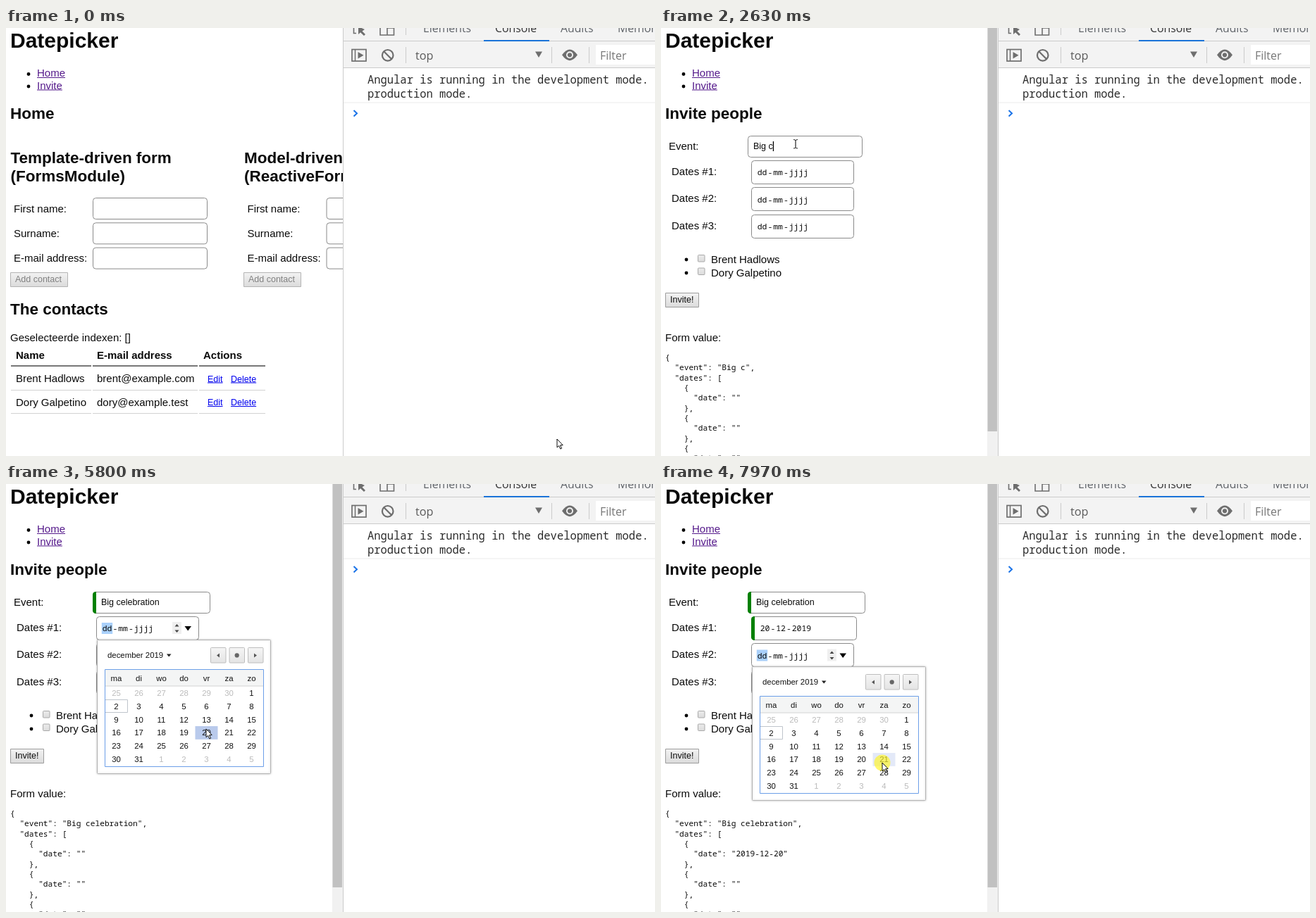
These frames come from a looping animation (921 px wide and 608 px high, 8 s). An HTML page with a canvas:

```html
<!DOCTYPE html>
<html lang="en">
<head>
<meta charset="utf-8">
<title>Datepicker</title>
<style>
html, body { margin: 0; width: 100%; height: 100%; overflow: hidden; background: #fff; }
canvas { display: block; width: 921px; height: 608px; }
</style>
</head>
<body>
<canvas id="stage" width="921" height="608"></canvas>
<script>
const ctx = document.getElementById('stage').getContext('2d');
const LOOP = 8000;
const SANS = '"Liberation Sans", Arial, sans-serif';
const UI = '"Open Sans", "Noto Sans", sans-serif';
const MONO = '"Noto Sans Mono", "DejaVu Sans Mono", monospace';
const BORDER = '#8a8a8a';
const INK = '#0a0a0a';
const PEOPLE = [['Brent Hadlows', 'brent@example.com'], ['Dory Galpetino', 'dory@example.test']];
const EVENT = 'Big celebration';

// The screen updates about 13 times a second: [ms, tick]
const CLOCK = [[0, 0], [70, 1], [840, 11], [1530, 20], [1700, 22], [1770, 23], [2170, 28], [2780, 36],
  [3030, 39], [4020, 52], [4870, 63], [5560, 72], [5730, 74], [5800, 75], [6340, 82], [6510, 84],
  [6970, 90], [7280, 94], [7970, 103], [8047, 104]];
// Pointer path: [tick, x, y]
const PATH = [[0, 782, 584], [9, 59, 77], [12, 59, 77], [17, 190, 144], [18, 190, 144], [20, 191, 165],
  [51, 191, 165], [60, 256, 204], [64, 256, 204], [69, 287, 421], [72, 284, 348], [76, 284, 348],
  [79, 256, 247], [80, 256, 247], [82, 257, 241], [86, 257, 241], [90, 332, 371], [94, 310, 399],
  [95, 310, 399], [99, 314, 396], [104, 314, 396]];
// Letters typed: [tick, count]
const TYPED = [[28, 1], [30, 2], [31, 3], [32, 4], [34, 5], [36, 7], [38, 8], [39, 9], [41, 10],
  [43, 11], [44, 12], [46, 14], [47, 15]];
const CLICKS = [11, 22, 61, 74, 84, 103];
const AT = { page: 12, focus: 23, type: 28, date1: 62, open1: 64, press: 75, pick: 76, date2: 85, open2: 87 };

const clamp = v => Math.max(0, Math.min(1, v));

function tickAt(ms) {
  const i = CLOCK.findIndex(c => c[0] > ms);
  const [a, b] = [CLOCK[i - 1], CLOCK[i]];
  return Math.floor(a[1] + (ms - a[0]) / (b[0] - a[0]) * (b[1] - a[1]) + 0.1);
}

function pointerAt(tick) {
  const i = PATH.findIndex(p => p[0] > tick);
  if (i < 0) return PATH[PATH.length - 1].slice(1);
  const [a, b] = [PATH[i - 1], PATH[i]];
  const p = (tick - a[0]) / (b[0] - a[0]);
  const e = p * p * (3 - 2 * p);
  return [a[1] + (b[1] - a[1]) * e, a[2] + (b[2] - a[2]) * e];
}

function text(s, x, y, font, color = INK, align = 'left') {
  ctx.font = font;
  ctx.fillStyle = color;
  ctx.textAlign = align;
  ctx.fillText(s, x, y);
}
const body = (s, x, y, color) => text(s, x, y, `15px ${SANS}`, color);
const bold = (s, x, y, size = 22.5) => text(s, x, y, `bold ${size}px ${SANS}`);

function rect(x, y, w, h, color) {
  ctx.fillStyle = color;
  ctx.fillRect(x, y, w, h);
}

function box(x, y, w, h, r, fill, stroke) {
  ctx.beginPath();
  ctx.roundRect(x, y, w, h, r);
  if (fill) { ctx.fillStyle = fill; ctx.fill(); }
  if (stroke) { ctx.strokeStyle = stroke; ctx.lineWidth = 1; ctx.stroke(); }
}

function poly(points, fill, stroke, width = 1) {
  ctx.beginPath();
  points.forEach(([x, y]) => ctx.lineTo(x, y));
  if (fill) { ctx.fillStyle = fill; ctx.fill(); }
  if (stroke) { ctx.strokeStyle = stroke; ctx.lineWidth = width; ctx.stroke(); }
}

function disc(x, y, r, color) {
  ctx.beginPath();
  ctx.arc(x, y, r, 0, 7);
  ctx.fillStyle = color;
  ctx.fill();
}

function link(s, x, y, size, color) {
  text(s, x, y, `${size}px ${SANS}`, color);
  rect(x, y + 1, ctx.measureText(s).width, 1, color);
}

function shade(y, h, top, bottom) {
  const g = ctx.createLinearGradient(0, y, 0, y + h);
  g.addColorStop(0, top);
  g.addColorStop(1, bottom);
  return g;
}

function button(s, x, y, w, disabled) {
  box(x + .5, y + .5, w - 1, 20, 0, shade(y, 20, '#f3f3f3', '#dcdcdc'), disabled ? '#b4b4b4' : '#9c9c9c');
  text(s, x + 7, y + 14, `12.5px ${SANS}`, disabled ? '#808080' : INK);
}

// Text field whose green left edge grows with p
function field(x, y, w, h, p) {
  const wide = w + 4 * p;
  box(x + .5, y + .5, wide - 1, h - 1, 4, '#fff', BORDER);
  if (!p) return;
  ctx.save();
  ctx.beginPath();
  ctx.roundRect(x, y, wide, h, 4.5);
  ctx.clip();
  const fade = Math.round(100 * (1 - p));
  rect(x, y, 1 + 4 * p, h, `rgb(${fade},${128 + fade / 10},${fade})`);
  ctx.restore();
}

function drawHeader() {
  bold('Datepicker', 6, 28, 30);
  ['Home', 'Invite'].forEach((s, i) => {
    disc(32, 65.5 + 17.5 * i, 2.4, '#000');
    link(s, 44, 69 + 17.5 * i, 15, '#551a8b');
  });
}

function drawForm(dx, title) {
  title.forEach((s, i) => bold(s, 6.5 + dx, 192 + 26 * i));
  ['First name:', 'Surname:', 'E-mail address:'].forEach((s, i) => {
    body(s, 11 + dx, 262 + 35 * i);
    field(123 + dx, 241 + 35.3 * i, 163, 31, 0);
  });
  button('Add contact', 6 + Math.floor(dx), 347, 82, true);
}

function drawHome() {
  bold('Home', 6, 129);
  drawForm(0, ['Template-driven form', '(FormsModule)']);
  drawForm(331.5, ['Model-driven form', '(ReactiveFormsModule)']);
  bold('The contacts', 6, 407);
  body('Geselecteerde indexen: []', 6, 445);
  const cols = [[7, 114, 'Name', 14], [123, 149, 'E-mail address', 129], [274, 94, 'Actions', 280]];
  cols.forEach(([x, w, s, tx]) => {
    bold(s, tx, 469.5, 15);
    rect(x, 479, w, 2, '#777');
    rect(x, 514, w, 1, '#d2d2d2');
    rect(x, 547, w, 1, '#d2d2d2');
  });
  PEOPLE.forEach(([name, mail], i) => {
    const y = 503 + 33.5 * i;
    body(name, 14, y);
    body(mail, 129, y);
    link('Edit', 286, y - .5, 12.5, '#00e');
    link('Delete', 319, y - .5, 12.5, '#00e');
  });
}

function drawEvent(tick, typed) {
  const p = tick < AT.date1 ? 0 : clamp((tick - AT.date1 + 1) / 3) ** .7;
  field(123, 153, 163, 31, p);
  text(typed, 131 + 4 * p, 172, `12.5px ${SANS}`);
  if (tick >= AT.focus && tick < AT.date1) {
    rect(131 + ctx.measureText(typed).width, 161, 1.3, 14, '#000');
  }
}

function drawDate(row, value, p, focused, hot, arrowHot) {
  const y = 188 + 38.5 * row;
  field(128, Math.floor(y), 146, 34, p);
  const x = 135.8 + 4 * p, base = y + 21;
  if (focused) rect(x, y + 9, 15.4, 16, '#a9d0fb');
  let at = x;
  value.split('-').forEach((part, i) => {
    const font = `11.45px ${MONO}`;
    if (i) { text('-', at, base, font); at += 6.87; }
    text(part, at + .94, base, font);
    at += part.length * 6.87 + 1.88;
  });
  if (!focused && !hot) return;
  rect(236, y + 8, 13, 17, '#efefef');
  if (arrowHot) rect(250, y + 8, 17, 17, '#efefef');
  poly([[239.5, y + 14.5], [242.5, y + 11], [245.5, y + 14.5]], '#444');
  poly([[239.5, y + 19.5], [242.5, y + 23], [245.5, y + 19.5]], '#444');
  poly([[253.5, y + 14], [263, y + 14], [258.2, y + 20.5]], '#000');
}

function drawCalendar(dy, [mx, my], pressed) {
  const font = `11.4px ${SANS}`, rowH = 18.8, top = 287.6;
  ctx.save();
  ctx.translate(0, dy);
  ctx.shadowColor = 'rgba(0,0,0,.2)';
  ctx.shadowBlur = 3;
  box(129.5, 221.5, 246, 190, 1, '#fff', '#b5b5b5');
  ctx.shadowColor = 'transparent';
  text('december 2019', 144, 247, font, '#111');
  poly([[228, 241.5], [234.5, 241.5], [231.2, 245.5]], '#222');
  [290, 316.5, 343].forEach(x => box(x + .5, 232.5, 21.5, 21.5, 1, shade(232, 22, '#f6f6f6', '#e4e4e4'), '#bdbdbd'));
  poly([[303, 240.5], [303, 246.5], [299, 243.5]], '#555');
  disc(327.7, 243.4, 3.1, '#666');
  poly([[352, 240.5], [352, 246.5], [356, 243.5]], '#555');

  rect(140, 264, 225, 23, '#f4f5f5');
  rect(140, 286.5, 225, 1, '#d4d4d4');
  ['ma', 'di', 'wo', 'do', 'vr', 'za', 'zo'].forEach((s, i) => text(s, 156.5 + 32 * i, 280, font, '#111', 'center'));

  const hc = Math.floor((mx - 140.5) / 32), hr = Math.floor((my - dy - top) / rowH);
  for (let i = 0; i < 42; i++) {
    const c = i % 7, r = Math.floor(i / 7), n = i - 5;
    const x = 140.5 + 32 * c, y = top + rowH * r;
    if (c === hc && r === hr) rect(x, y, 32, rowH, pressed ? '#b9caec' : '#e3e9f8');
    if (n === 2) box(x, Math.round(y) + .5, 32, 18, 0, null, '#bfc5cc');
    const label = n < 1 ? n + 30 : n > 31 ? n - 31 : n;
    text(label, x + 16, y + 13.4, font, label === n ? '#111' : '#bbb', 'center');
  }
  box(140.5, 263.5, 225, 138, 0, null, '#6c9fe8');
  ctx.restore();
}

function drawJson(event, date) {
  const lines = ['{', `  "event": "${event}",`, '  "dates": ['];
  [date, '', ''].forEach(d => lines.push('    {', `      "date": "${d}"`, '    },'));
  lines.forEach((s, i) => text(s, 6, 472 + 14.32 * i, `11.17px ${MONO}`));
}

function drawInvite(tick, mouse) {
  const typed = EVENT.slice(0, TYPED.reduce((n, [k, count]) => tick >= k ? count : n, 0));
  const picked = tick >= AT.pick;
  const empty = 'dd-mm-jjjj';
  const onDate = y => mouse[0] > 128 && mouse[0] < 274 && mouse[1] > y && mouse[1] < y + 34;
  const onArrow = mouse[0] > 250 && mouse[0] < 267;
  const green = tick < AT.date2 ? 0 : clamp((tick - AT.date2 + 1) / 3) ** .7;
  const open1 = tick >= AT.open1 && !picked, open2 = tick >= AT.open2;
  const free = !open1 && !open2;

  bold('Invite people', 6, 129);
  body('Event:', 11, 173);
  [1, 2, 3].forEach(n => body(`Dates #${n}:`, 15, 170 + 38.5 * n));
  drawEvent(tick, typed);
  const hot1 = free && onDate(188), hot2 = free && onDate(226);
  drawDate(0, picked ? '20-12-2019' : empty, green, tick >= AT.date1 && tick < AT.date2, hot1, hot1 && onArrow);
  drawDate(1, empty, 0, tick >= AT.date2, hot2, hot2 && onArrow);
  drawDate(2, empty, 0, false, false);
  PEOPLE.forEach(([name], i) => {
    disc(36, 329 + 19 * i, 2.4, '#000');
    box(52.5, 322.5 + 18.5 * i, 9.5, 9.5, 1, shade(322 + 18.5 * i, 10, '#ececec', '#dcdcdc'), '#a9a9a9');
    body(name, 71, 334 + 19 * i);
  });
  button('Invite!', 6, 376, 48);
  body('Form value:', 6, 445);
  drawJson(typed, picked ? '2019-12-20' : '');
  rect(463, 0, 15, 608, '#f1f1f1');
  rect(463.5, 0, 13.5, 573, '#c1c1c1');

  if (tick >= AT.focus && tick < AT.type) {
    ctx.save();
    ctx.shadowColor = 'rgba(0,0,0,.35)';
    ctx.shadowBlur = 4;
    ctx.shadowOffsetY = 1;
    box(123.5, 184, 181, 48.5, 3, '#fff');
    ctx.restore();
    text('My birthday', 134.5, 212.5, `12.2px ${UI}`, '#222');
  }
  if (open1) drawCalendar(0, mouse, tick === AT.press);
  if (open2) drawCalendar(38, mouse, false);
}

function drawTools() {
  const gray = '#6e6e6e', line = '#cbcbcb';
  rect(478, 0, 443, 608, '#fff');
  rect(479, 0, 442, 56, '#f3f3f3');
  rect(478, 0, 1, 608, line);
  rect(479, 18, 442, 1, line);
  rect(479, 56, 442, 1, line);
  rect(479, 105.5, 442, 1, '#ececec');
  rect(678, 17, 93, 2, '#1a73d8');

  const tab = `15.8px ${UI}`;
  [['Elements', 592], ['Console', 694], ['Audits', 787], ['Memory', 868]].forEach(([s, x], i) =>
    text(s, x, 6, tab, i === 1 ? '#333' : '#5f6368'));
  poly([[493.5, 0], [493.5, 7.5], [497, 7.5]], null, gray, 1.6);
  poly([[500, -2], [500, 9], [503, 6.2], [508, 11], [510, 9], [505.5, 4.5], [509, 2]], gray);
  poly([[531, -2], [531, 10], [550.5, 10], [550.5, 0], [541, 0], [541, 10]], null, gray, 1.6);
  rect(567, 0, 1, 10, line);

  [567, 774, 827].forEach(x => rect(x, 27, 1, 23, line));
  ctx.strokeStyle = gray;
  ctx.lineWidth = 1.7;
  ctx.strokeRect(491, 30.5, 20, 16.5);
  poly([[495.5, 30.5], [495.5, 47]], null, gray, 1.5);
  poly([[499.5, 34], [507.5, 38.8], [499.5, 43.5]], gray);
  ctx.beginPath();
  ctx.arc(541.7, 38.8, 7.8, 0, 7);
  ctx.lineWidth = 2.2;
  ctx.stroke();
  poly([[536.2, 33.3], [547.2, 44.3]], null, gray, 2.2);
  text('top', 581, 44.5, `16.2px ${UI}`, '#5a5a5a');
  poly([[751, 33.5], [761, 33.5], [756, 42]], gray);
  ctx.beginPath();
  ctx.moveTo(789, 38.3);
  ctx.quadraticCurveTo(800, 22.5, 811, 38.3);
  ctx.quadraticCurveTo(800, 54, 789, 38.3);
  ctx.fillStyle = gray;
  ctx.fill();
  disc(800, 38.3, 5, '#f3f3f3');
  disc(800, 38.3, 3.1, gray);
  rect(837, 24, 84, 28, '#fff');
  text('Filter', 843, 44.5, `16px ${UI}`, '#777');

  const log = `15.46px ${MONO}`;
  text('Angular is running in the development mode.', 513, 79, log, '#2a2a2a');
  text('production mode.', 513, 99, log, '#2a2a2a');
  poly([[493.5, 117], [498, 121.2], [493.5, 125.4]], null, '#1a73e8', 2);
}

function drawPointer([x, y], tick) {
  if (CLICKS.includes(tick)) disc(x, y, 11.5, 'rgba(255,245,40,.68)');
  ctx.save();
  ctx.translate(x, y);
  if (x > 44 && x < 80 && y > 75 && y < 90) {
    box(-4, 5, 11, 10, 3, '#fff', '#000');
    box(-1.5, -.5, 3, 9, 1.5, '#fff', '#000');
    rect(-1, 6, 7, 3, '#fff');
  } else if (tick >= AT.page && x > 123 && x < 286 && y > 153 && y < 184) {
    poly([[-3, -6.5], [-.6, -6], [0, -5], [.6, -6], [3, -6.5]], null, '#222');
    poly([[0, -5], [0, 5]], null, '#222', 1.2);
    poly([[-3, 6], [-.6, 5.6], [0, 5], [.6, 5.6], [3, 6]], null, '#222');
  } else {
    poly([[0, 0], [0, 11.8], [2.7, 9.4], [4.8, 14], [6.6, 13.2], [4.6, 8.7], [8.2, 8.5], [0, 0], [0, 1]], '#fff', '#111');
  }
  ctx.restore();
}

function draw(ms) {
  const tick = tickAt(ms), mouse = pointerAt(tick);
  rect(0, 0, 921, 608, '#fff');
  drawHeader();
  if (tick < AT.page) drawHome();
  else drawInvite(tick, mouse);
  drawTools();
  drawPointer(mouse, tick);
}

let start;
function loop(now) {
  start ??= now;
  draw((now - start) % LOOP);
  requestAnimationFrame(loop);
}
draw(0);
requestAnimationFrame(loop);
</script>
</body>
</html>
```
